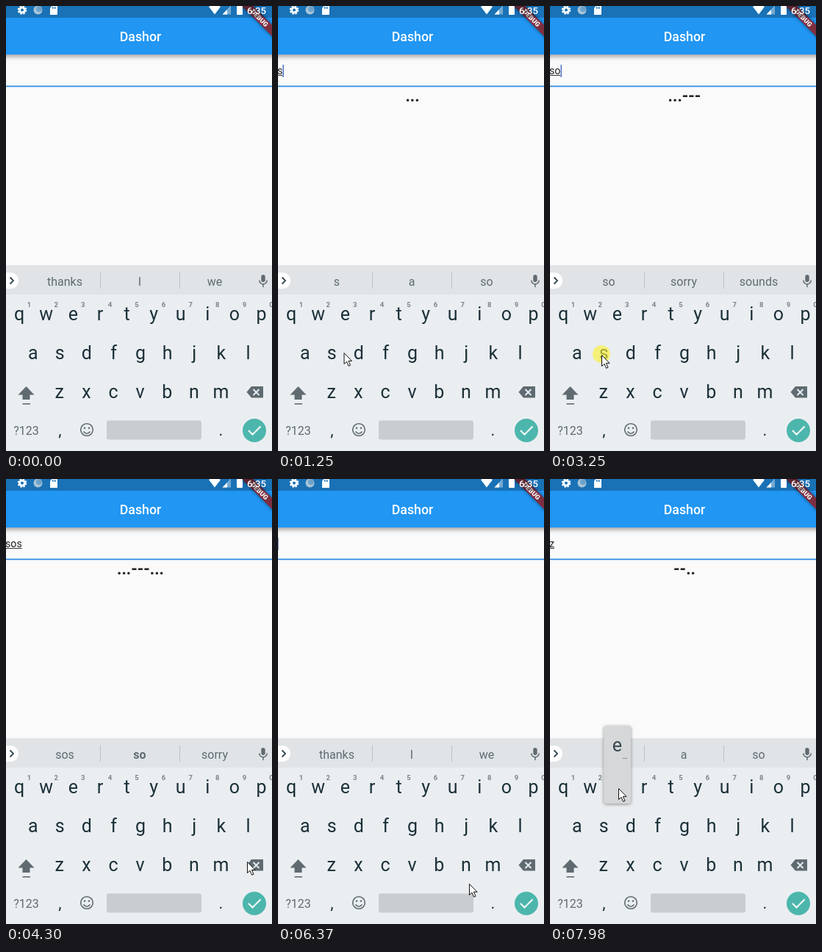
An HTML page with a canvas for the animation above (8000 ms loop, 362 by 606 pixels).

```html
<!DOCTYPE html>
<html>
<head>
<meta charset="utf-8">
<style>
html, body { margin: 0; width: 100%; height: 100%; overflow: hidden; background: #fafafa; }
canvas { display: block; }
</style>
</head>
<body>
<canvas id="stage" width="362" height="606"></canvas>
<script>
const ctx = document.getElementById('stage').getContext('2d');
const LOOP = 8000, PITCH = 36.6, ROW = 53, CENTER = 183;
const INK = '#1c3038', GREY = '#5f6b71';

// Pointer way points: time, x, y
const path = [
  [280, 196, 604], [850, 82, 472], [1200, 82, 472], [1250, 89.5, 472], [1990, 316, 425],
  [2300, 316, 425], [2840, 69, 475], [2890, 70, 475], [3790, 70, 475], [4300, 328, 521],
  [4400, 341, 527], [6320, 341, 527], [6370, 260, 551], [6850, 72, 531], [7130, 72, 531],
  [7720, 93, 421]
];

// Key presses; a press with no letter is a backspace
const presses = [
  { at: 880, letter: 's', x: 73, row: 1, text: 's' },
  { at: 2110, letter: 'o', x: 311, row: 0, text: 'so' },
  { at: 3250, letter: 's', x: 73, row: 1, text: 'sos' },
  { at: 4880, text: 'so' },
  { at: 5320, text: 's' },
  { at: 5930, text: '' },
  { at: 6900, letter: 'z', x: 73, row: 2, text: 'z' },
  { at: 7900, letter: 'e', x: 91.5, row: 0, text: 'e' }
];
const typedAt = p => p.at + (p.letter ? 130 : 80);

const morse = { s: '...', o: '---', z: '--..', e: '.' };
const suggestions = {
  '': ['thanks', 'I', 'we'],
  s: ['s', 'a', 'so'],
  so: ['so', 'sorry', 'sounds'],
  sos: ['sos', 'so', 'sorry'],
  z: ['z', 'a', 'so']
};

function rect(x, y, w, h, color, radius = 0) {
  ctx.fillStyle = color;
  ctx.beginPath();
  ctx.roundRect(x, y, w, h, radius);
  ctx.fill();
}
function disc(x, y, r, color) {
  ctx.fillStyle = color;
  ctx.beginPath();
  ctx.arc(x, y, r, 0, 7);
  ctx.fill();
}
function text(str, x, y, size, color = INK, weight = 400, align = 'center') {
  ctx.font = `${weight} ${size}px Roboto, sans-serif`;
  ctx.textAlign = align;
  ctx.fillStyle = color;
  ctx.fillText(str, x, y);
}
function fill(d, color) {
  ctx.fillStyle = color;
  ctx.fill(new Path2D(d));
}
function stroke(d, color, width) {
  ctx.strokeStyle = color;
  ctx.lineWidth = width;
  ctx.stroke(new Path2D(d));
}
function shadow(blur, dy, alpha) {
  ctx.shadowBlur = blur;
  ctx.shadowOffsetY = dy;
  ctx.shadowColor = `rgba(0,0,0,${alpha})`;
}

function drawBanner() {
  ctx.save();
  ctx.translate(366.5, -5);
  ctx.rotate(Math.PI / 4);
  shadow(5, 0, 0.5);
  rect(-36, 25, 72, 10.7, '#7d2f40');
  ctx.shadowColor = 'transparent';
  text('DEBUG', 0, 33.5, 9, '#fff', 900);
  ctx.restore();
}

function drawStatusBar() {
  rect(0, 0, 362, 16, 'rgba(0,0,0,0.25)');
  ctx.setLineDash([2.3, 1.63]);
  stroke('M27 5.5a5 5 0 1 1-10 0a5 5 0 1 1 10 0', '#fff', 2.6);
  ctx.setLineDash([]);
  stroke('M25.4 5.5a3.4 3.4 0 1 1-6.8 0a3.4 3.4 0 1 1 6.8 0', '#fff', 2.8);
  disc(43.5, 5.5, 6, '#a9c4d8');
  disc(45, 4, 4, '#6fa3cb');
  fill('M63-1H70V12H60V3Z', '#fff');
  fill('M63 1h1v3h-1zM65 1h1v3h-1zM67 1h1v3h-1z', '#1971b6');
  fill('M276 1Q284-4 292 1L284 11.5Z', '#fff');
  fill('M306-1V11.5H294.5Z', 'rgba(255,255,255,0.4)');
  fill('M301 5V11.5H294.5Z', '#fff');
  rect(314, 0, 8, 12, '#fff', 1);
  text('6:35', 341, 10.5, 13.2, '#fff', 500);
}

function drawApp(value, caretOn) {
  rect(0, 0, 362, 606, '#fafafa');
  ctx.save();
  shadow(6, 3, 0.36);
  rect(-10, -10, 382, 76, '#2196f3');
  ctx.restore();
  text('Dashor', CENTER, 48, 17.8, '#fff', 500);
  drawBanner();
  drawStatusBar();

  ctx.font = '400 14.2px Roboto, sans-serif';
  const end = ctx.measureText(value).width - 1;
  text(value, -1, 93, 14.2, '#222', 400, 'left');
  if (value) rect(0, 94, end, 1, '#333');
  if (caretOn) rect(end, 80, 1.7, 17, '#5b82c8');
  rect(0, 108.5, 362, 1.8, '#2f8fe2');
  text([...value].map(c => morse[c]).join(''), CENTER, 130, 22, '#222', 700);
}

function drawSuggestions(value) {
  rect(0, 353, 362, 40, '#e0e4e7');
  rect(-12, 363, 29, 22, '#fff', 11);
  stroke('M5.5 369.5L10 374L5.5 378.5', '#37474f', 1.8);
  rect(128, 363, 1, 22, '#bcc2c6');
  rect(236, 363, 1, 22, '#bcc2c6');
  suggestions[value].forEach((word, i) =>
    text(word, 80 + i * 102, 380.5, 16, GREY, value === 'sos' && i === 1 ? 700 : 400));
  rect(347.3, 366, 5.4, 10, GREY, 2.7);
  stroke('M344.7 373.5a5.3 5.3 0 0 0 10.6 0M350 379v4', GREY, 1.5);
}

function drawKeys(deleting) {
  rect(0, 393, 362, 213, '#eaeef1');
  if (deleting) rect(317, 502, 48, 45, '#d5dadd', 4);
  ['qwertyuiop', 'asdfghjkl', 'zxcvbnm'].forEach((letters, row) => {
    const left = [18.1, 36.7, 72.8][row];
    [...letters].forEach((c, i) => {
      const x = left + i * PITCH;
      text(c, x, 428 + row * ROW, 25);
      if (!row) text((i + 1) % 10, x + 13.5, 410, 9.5, '#7b858a', 700);
    });
  });

  fill('M27.5 518L38.5 529.5H32.5V536H22.5V529.5H16.5Z', GREY);
  rect(22.5, 541, 10.5, 1.6, GREY);
  fill('M334 518H350V533.5H334L327.5 525.8Z', GREY);
  stroke('M336.5 522L344.5 530M344.5 522L336.5 530', '#eaeef1', 1.8);

  text('?123', 27.5, 583.5, 16, GREY);
  text(',', 73.5, 585, 22);
  text('.', 292.5, 585, 22);
  stroke('M118.3 577a8.3 8.3 0 1 1-16.6 0a8.3 8.3 0 1 1 16.6 0M105.5 579.5Q110 585 114.5 579.5', GREY, 1.6);
  disc(107, 574.7, 1.3, GREY);
  disc(113, 574.7, 1.3, GREY);
  rect(137, 564.5, 129, 26, '#c8cdd0', 3);
  disc(338, 578, 16, '#4db6ac');
  stroke('M330 578L335.5 583.5L346.5 572.5', '#fff', 2);
}

function drawPopup({ letter, x, row }) {
  const top = 336 + row * ROW;
  ctx.save();
  shadow(4, 1, 0.4);
  rect(x - 18.3, top, 37, 106, '#d5d7d9', 4);
  ctx.restore();
  text(letter, x, top + 35, 25, '#37474f');
  text('…', x + 10.5, top + 45, 10.5, '#37474f');
}

function pointerAt(t) {
  const next = path.findIndex(p => p[0] > t);
  if (next < 0) return path[path.length - 1].slice(1);
  const [t0, x0, y0] = path[next - 1], [t1, x1, y1] = path[next];
  const u = (t - t0) / (t1 - t0), e = u * u * (3 - 2 * u);
  return [x0 + (x1 - x0) * e, y0 + (y1 - y0) * e];
}

function drawPointer(t, clicked) {
  if (t < path[0][0]) return;
  const [x, y] = pointerAt(t);
  if (clicked) disc(x, y - 1, 12, 'rgba(250,240,45,0.62)');
  ctx.save();
  ctx.translate(x, y);
  const arrow = 'M.5 .5V15.5L4 12.3L6.6 18.3L9 17.2L6.4 11.4H11Z';
  fill(arrow, '#fff');
  stroke(arrow, '#111', 1);
  ctx.restore();
}

function draw(t) {
  const typed = presses.filter(p => typedAt(p) <= t).pop();
  const value = typed ? typed.text : '';
  const caretOn = Math.floor((t - (typed ? typedAt(typed) : -700)) / 500) % 2 === 0;
  const press = presses.find(p => t >= p.at && t < p.at + 190);
  const age = press ? t - press.at : 0;

  drawApp(value, caretOn);
  drawSuggestions(value);
  drawKeys(press && !press.letter && age < 140);
  if (press && press.letter && age >= 40) drawPopup(press);
  drawPointer(t, press && age < 75);
}

function tick() {
  draw(performance.now() % LOOP);
  requestAnimationFrame(tick);
}
tick();
</script>
</body>
</html>
```
